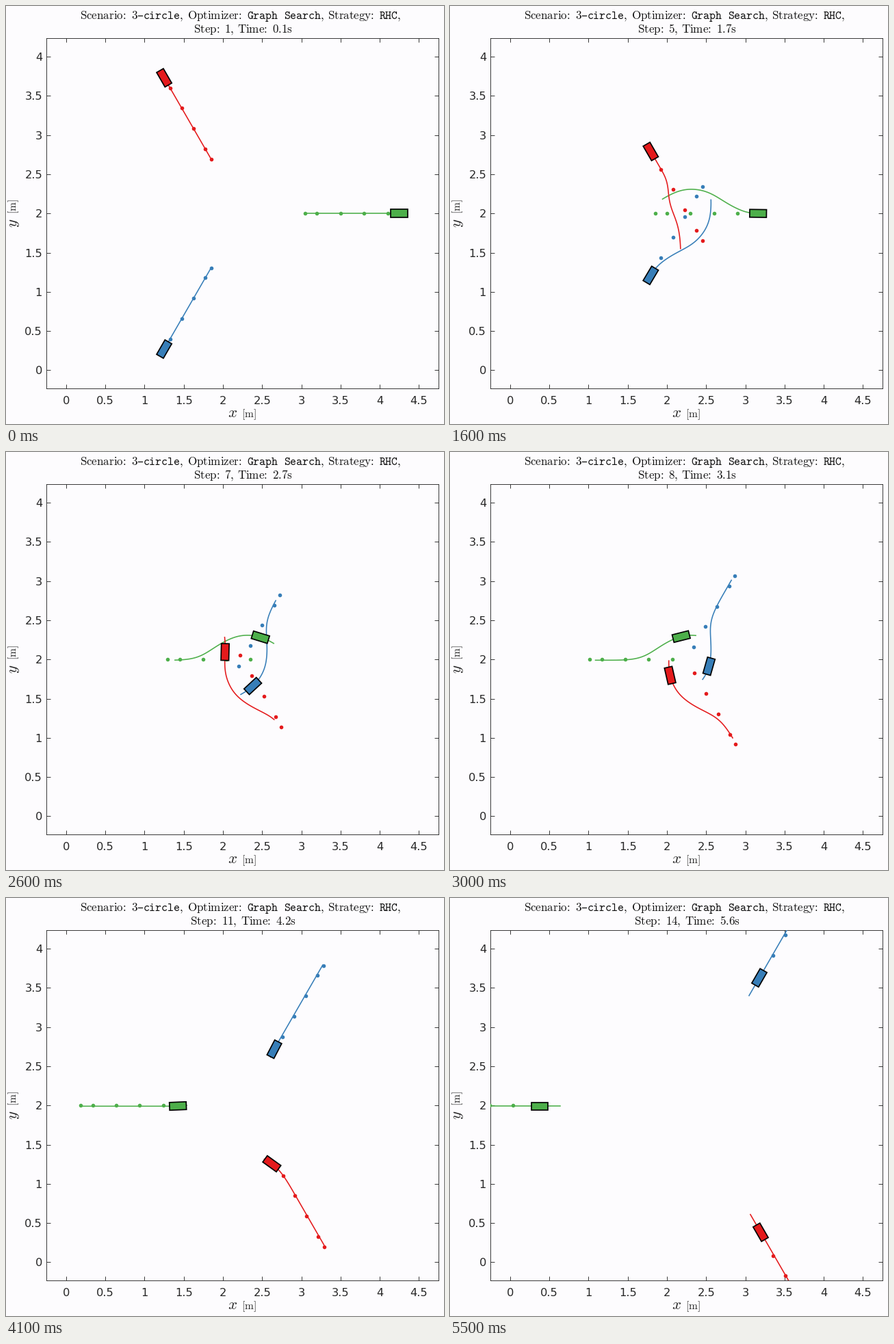
A matplotlib script that plays this animation: 640x611 px, repeating every 5.6 s.

```python
import numpy as np
import matplotlib.pyplot as plt
from matplotlib.animation import FuncAnimation
from matplotlib.lines import Line2D
from matplotlib.patches import Polygon

W, H, DPI = 640, 611, 100
PX = 72 / DPI                       # points per pixel
FRAMES, INTERVAL = 56, 100
STEP, SPEED = 0.4, 0.75             # planning period [s], cruise speed [m/s]
HOP = STEP * SPEED                  # distance per planning period [m]
CAR_L, CAR_W = 0.214, 0.1
CENTER = np.array([2.25, 2.0])
CURVE_START = 3.5 * HOP
DS = 0.005

# Turn away from the straight line [deg] at each hop of the manoeuvre
STRAIGHT = (0, 0)
SWERVE = (0, -24, -31, -6, 24, 32, 7, 0)
HESITATE = (0, -24, -9, -23, -31)

BG, INK, TITLE = "#fdfcfe", "#262626", "#111111"

plt.rcParams["font.family"] = "DejaVu Sans"
plt.rcParams["mathtext.fontset"] = "cm"


def unit(deg):
    a = np.radians(deg)
    return np.array([np.cos(a), np.sin(a)])


def ease(keys, u):
    """Smooth curve through evenly spaced keys, flat at both ends."""
    k = np.array(keys, float)
    g = np.gradient(k)
    g[[0, -1]] = 0
    u = np.clip(u, 0, len(k) - 1)
    i = np.minimum(u.astype(int), len(k) - 2)
    t = u - i
    return (k[i] + (k[i + 1] - k[i]) * t * t * (3 - 2 * t)
            + g[i] * t * (1 - t) ** 2 - g[i + 1] * t * t * (1 - t))


def travelled(t):
    if t < STEP:
        return SPEED / STEP * t * t / 2
    return SPEED * (t - STEP / 2)


class Route:
    """Path found by integrating the heading over the arc length."""

    def __init__(self, angle, turns, delay=0):
        self.s = np.arange(0, 6, DS)
        hops = (self.s - CURVE_START) / HOP - delay
        self.angle = angle + ease(turns, hops)
        moves = unit(self.angle).T * DS
        self.xy = CENTER - 2 * unit(angle) + np.cumsum(moves, axis=0) - moves[0]

    def at(self, s):
        return np.stack([np.interp(s, self.s, c) for c in self.xy.T], axis=-1)

    def heading(self, s):
        return unit(np.interp(s, self.s, self.angle))


class Vehicle:
    def __init__(self, ax, color, angle, delay=0, early=SWERVE):
        self.dir = unit(angle)
        self.start = CENTER - 2 * self.dir
        self.straight = Route(angle, STRAIGHT)
        self.early = Route(angle, early, delay)
        self.route = Route(angle, SWERVE, delay)
        self.line, = ax.plot([], [], color=color, lw=1.6 * PX, zorder=3)
        self.dots, = ax.plot([], [], "o", color=color, ms=5.6 * PX, mew=0, zorder=4)
        self.body = ax.add_patch(Polygon(np.zeros((4, 2)), fc=color, ec="black",
                                         lw=1.7 * PX, joinstyle="miter", zorder=5))

    def plan(self, step):
        if step <= 3:
            return self.straight
        return self.early if step <= 5 else self.route

    def update(self, step, t):
        s0 = travelled((step - 1) * STEP)
        first = HOP / 2 if step == 1 else HOP
        ahead = first + HOP * np.array([0, 1, 2, 3, 3.5])
        self.line.set_data(*self.plan(step).at(np.linspace(s0, s0 + ahead[-1], 120)).T)

        base = (self.route.at(s0) - self.start) @ self.dir
        self.dots.set_data(*(self.start + np.outer(base + ahead, self.dir)).T)

        s = travelled(t)
        c, d = self.route.at(s), self.route.heading(s)
        f = d * CAR_L / 2
        side = np.array([-d[1], d[0]]) * CAR_W / 2
        self.body.set_xy([c + f + side, c + f - side, c - f - side, c - f + side])


fig = plt.figure(figsize=(W / DPI, H / DPI), dpi=DPI, facecolor=BG)
ax = fig.add_axes([59.1 / W, (H - 559.2) / H, 573 / W, 512 / H], facecolor=BG)
ax.set_xlim(-0.25, 4.75)
ax.set_ylim(2 - 256 / 114.6, 2 + 256 / 114.6)
for axis, top in ((ax.xaxis, 4.5), (ax.yaxis, 4)):
    ticks = np.arange(0, top + 0.1, 0.5)
    axis.set_ticks(ticks, [f"{v:g}" for v in ticks])
ax.tick_params(direction="in", top=True, right=True, length=6 * PX, width=0.9 * PX,
               color=INK, labelcolor=INK, labelsize=16.2 * PX)
ax.tick_params(axis="x", pad=10.5 * PX)
ax.tick_params(axis="y", pad=6 * PX)
for spine in ax.spines.values():
    spine.set(color=INK, linewidth=0.9 * PX)


def tex(x, y, body, size=17, rotation=0, color=TITLE):
    return fig.text(x / W, 1 - y / H, f"${body}$", fontsize=size * PX, color=color,
                    rotation=rotation, rotation_mode="anchor",
                    ha="left", va="baseline")


def roman(s):
    return r"\text{%s}" % s


def mono(s):
    return r"\mathtt{%s}" % s


EM = 17
ROW1, ROW2 = 19, 39
for x, body in ((108, roman("Scenario:")),
                (182.7, mono("3")),
                (200.5, mono("circle") + roman(",")),
                (265, roman("Optimizer:")),
                (351.9, mono("Graph")),
                (405.5, mono("Search") + roman(",")),
                (469.9, roman("Strategy:")),
                (545, mono("RHC") + roman(","))):
    tex(x, ROW1, body)
hyphen_y = 1 - (ROW1 - 4.6) / H
fig.add_artist(Line2D([193 / W, 199.2 / W], [hyphen_y] * 2, color=TITLE,
                      lw=1.3 * PX))

tex(324, 601.2, "x", 23, color=INK)
tex(344.5, 601.2, roman("[m]"), 15.5, color=INK)
tex(15.5, 324, "y", 23, 90, INK)
tex(15.5, 304.5, roman("[m]"), 15.5, 90, INK)

step_word = tex(0, ROW2, roman("Step:"))
step_num = tex(0, ROW2, roman("1,"))
time_word = tex(0, ROW2, roman("Time:"))
time_num = tex(0, ROW2, roman("0.1s"))

vehicles = [Vehicle(ax, "#4daf4a", 180),
            Vehicle(ax, "#377eb8", 60),
            Vehicle(ax, "#e41a1c", -60, delay=1, early=HESITATE)]


def update(n):
    step = n // 4 + 1
    for v in vehicles:
        v.update(step, (n + 0.5) * 0.1)

    digits = 0.5 * len(str(step))
    x = 345.7 - (7.977 + digits) * EM / 2
    step_num.set_text(f"${roman(f'{step},')}$")
    time_num.set_text(f"${roman(f'{(n + 1) / 10:.1f}s')}$")
    for item, em in ((step_word, 0), (step_num, 2.667),
                     (time_word, 3.306 + digits), (time_num, 6.305 + digits)):
        item.set_x((x + em * EM) / W)
    return []


anim = FuncAnimation(fig, update, frames=FRAMES, interval=INTERVAL,
                     repeat=True, repeat_delay=0, blit=False)
plt.show()
```
